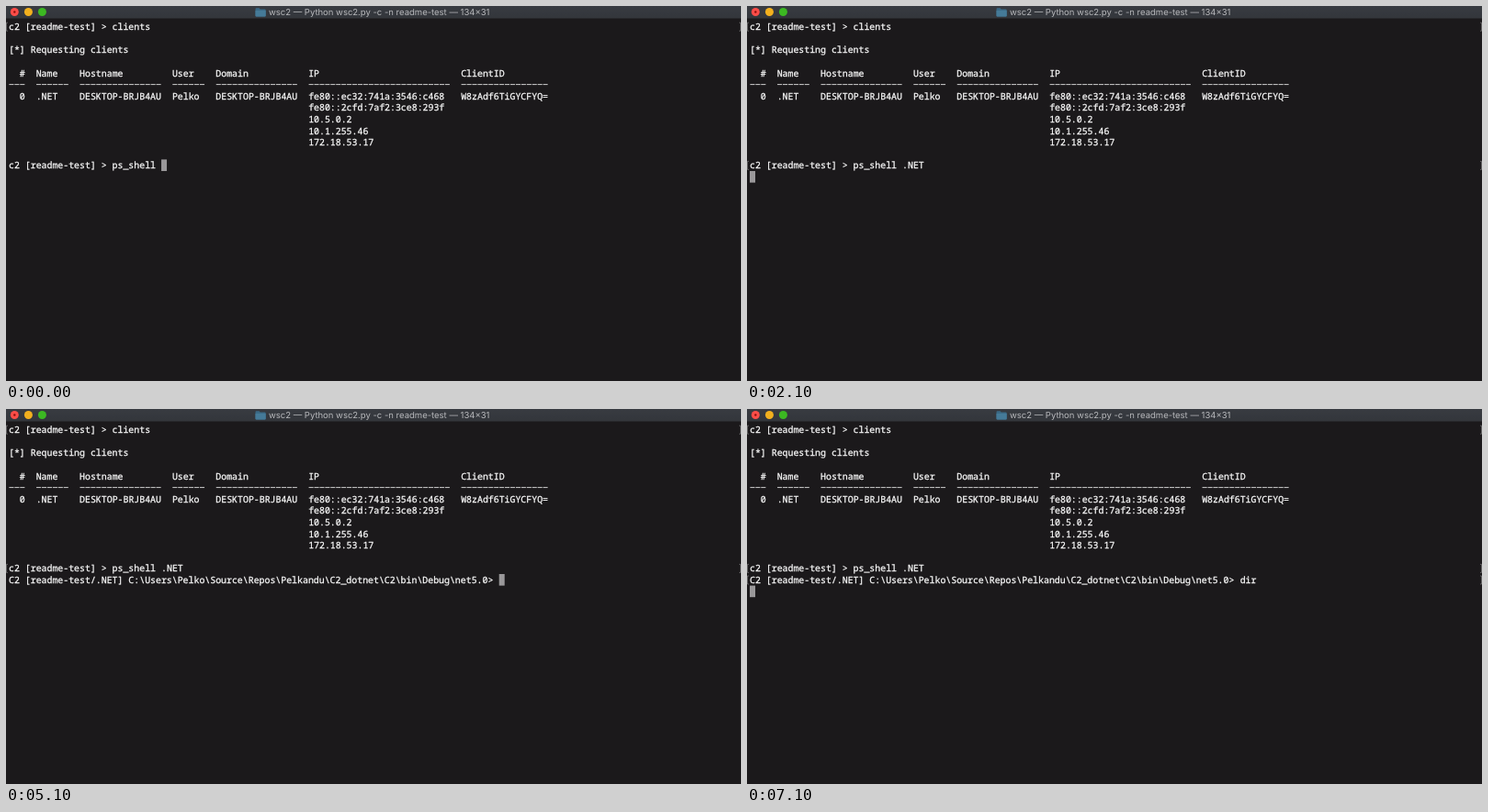
Recreate the animation shown at these times as an HTML page. Size 800 px wide and 409 px high, loop 8 s.

```html
<!DOCTYPE html>
<html lang="en">
<head>
<meta charset="utf-8">
<title>Terminal</title>
<style>
  html, body { margin: 0; width: 100%; height: 100%; overflow: hidden; background: #1b191b; }
  svg { display: block; width: 100vw; height: 100vh; }
  text { white-space: pre; text-rendering: geometricPrecision; }
  .mono {
    font: 500 9.88px "Noto Sans Mono", "DejaVu Sans Mono", monospace;
    color: #fbfbfb; fill: currentColor; stroke: currentColor; stroke-width: .28;
  }
  .hint { color: #6c6a6c; }
  .title { font: 400 9.5px Inter, Roboto, sans-serif; fill: #b8b9bc; }
  .mark { fill: none; stroke: #777577; stroke-width: .8; }
  .rule { stroke: #e4e4e4; stroke-width: .9; stroke-dasharray: 5.1 .83; }
</style>
</head>
<body>
<svg id="stage" viewBox="0 0 800 409">
  <defs>
    <linearGradient id="bar" x2="0" y2="1">
      <stop offset="0" stop-color="#383b41"/>
      <stop offset="1" stop-color="#33363b"/>
    </linearGradient>
  </defs>
  <rect width="800" height="409" fill="#1b191b"/>
  <rect width="800" height="13.5" fill="url(#bar)"/>
  <circle cx="9.3" cy="6.5" r="4.5" fill="#fc4d48"/>
  <circle cx="9.3" cy="6.5" r="1.2" fill="#8a100c"/>
  <circle cx="24.4" cy="6.5" r="4.5" fill="#f2b01e"/>
  <circle cx="39.4" cy="6.5" r="4.5" fill="#3cb822"/>
  <path d="M271.5 3.2q0-1 1-1h3l1.2 1.2h5q1 0 1 1v6q0 1-1 1h-9.2q-1 0-1-1z" fill="#3a6a86"/>
  <path d="M271.5 5h11.2v5.4q0 1-1 1h-9.2q-1 0-1-1z" fill="#457a98"/>
  <text class="title" x="286" y="10.1">wsc2 — Python wsc2.py -c -n readme-test — 134×31</text>
</svg>
<script>
const LOOP = 8000, LEFT = 3, TOP = 16.2, CW = 5.93, LH = 12.6;
const stage = document.getElementById('stage');

function add(tag, attrs) {
  const el = document.createElementNS('http://www.w3.org/2000/svg', tag);
  for (const key in attrs) el.setAttribute(key, attrs[key]);
  return stage.appendChild(el);
}

const colX = col => LEFT + col * CW;
const rowY = row => TOP + row * LH;

function write(row, col, str, cls = 'mono') {
  const el = add('text', { x: colX(col), y: rowY(row) + 9.9, class: cls });
  el.textContent = str;
  return el;
}

// Dashed underline, one dash per character cell
function rule(row, col, width) {
  const y = rowY(row) + 6.4;
  add('path', { class: 'rule', d: `M${colX(col) + .4} ${y}H${colX(col + width) - .4}` });
}

// Prompt brackets at both window edges
function mark(row) {
  const y = rowY(row) + 2;
  return add('path', { class: 'mark', d: `M2 ${y}H.5v9H2M798 ${y}h1.5v9H798` });
}

write(0, 0, 'c2 [readme-test] > clients');
write(2, 0, '[*] Requesting clients');
mark(0);

const columns = [
  [0, 3, '  #', '  0'],
  [5, 6, 'Name', '.NET'],
  [13, 15, 'Hostname', 'DESKTOP-BRJB4AU'],
  [30, 6, 'User', 'Pelko'],
  [38, 15, 'Domain', 'DESKTOP-BRJB4AU'],
  [55, 26, 'IP', 'fe80::ec32:741a:3546:c468', 'fe80::2cfd:7af2:3ce8:293f',
    '10.5.0.2', '10.1.255.46', '172.18.53.17'],
  [83, 16, 'ClientID', 'W8zAdf6TiGYCFYQ=']
];
for (const [col, width, head, ...cells] of columns) {
  write(4, col, head);
  rule(5, col, width);
  cells.forEach((cell, i) => write(6 + i, col, cell));
}

const ask = 'c2 [readme-test] > ps_shell ';
const path = 'C2 [readme-test/.NET] C:\\Users\\Pelko\\Source\\Repos\\Pelkandu\\C2_dotnet\\C2\\bin\\Debug\\net5.0> ';
write(12, 0, ask);
const arg = write(12, ask.length, '');
const hint = write(12, ask.length + 2, 'ET', 'mono hint');
const shell = write(13, 0, path);
const cmd = write(13, path.length, '');
const marks = [mark(12), mark(13)];
const cursor = add('rect', { width: 6, height: LH, fill: '#9a989a' });

// time, argument, hint shown, prompt shown, command, cursor row
const steps = [
  [0, '', 0, 0, '', 12],
  [300, '.', 0, 0, '', 12],
  [400, '.', 1, 0, '', 12],
  [600, '.NET', 0, 0, '', 12],
  [1000, '.NET', 0, 0, '', 13],
  [4100, '.NET', 0, 1, '', 13],
  [6000, '.NET', 0, 1, 'i', 13],
  [6400, '.NET', 0, 1, 'd', 13],
  [6600, '.NET', 0, 1, 'di', 13],
  [6700, '.NET', 0, 1, 'dir', 13],
  [6800, '.NET', 0, 1, 'dir', 14]
];

const show = (el, on) => el.setAttribute('visibility', on ? 'visible' : 'hidden');
let last = null;

function render(time) {
  const step = steps.filter(s => s[0] <= time).pop();
  if (step === last) return;
  last = step;
  const [, argText, hinted, prompted, cmdText, row] = step;
  arg.textContent = argText;
  cmd.textContent = cmdText;
  show(hint, hinted);
  show(shell, prompted);
  marks.forEach((m, i) => show(m, row > 12 + i));
  let col = 0;
  if (row === 12) col = ask.length + argText.length;
  else if (row === 13 && prompted) col = path.length + cmdText.length;
  cursor.setAttribute('x', colX(col));
  cursor.setAttribute('y', rowY(row));
}

const start = performance.now();
function tick() {
  render((performance.now() - start) % LOOP);
  requestAnimationFrame(tick);
}
render(0);
requestAnimationFrame(tick);
</script>
</body>
</html>
```
